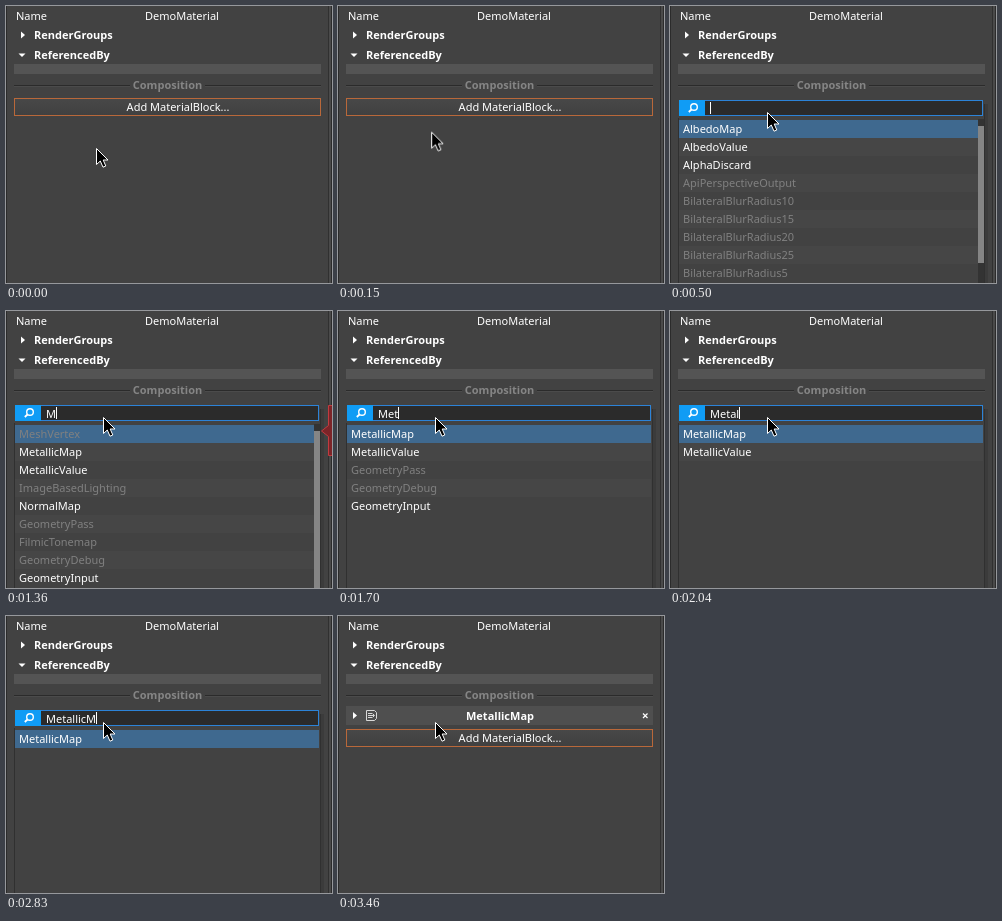
Animation, 326 px wide and 277 px high, one loop 4520 ms. Source, as an HTML page:

```html
<!DOCTYPE html>
<html lang="en">
<head>
<meta charset="utf-8">
<title>Material editor</title>
<style>
  html, body { margin: 0; width: 100%; height: 100%; overflow: hidden; background: #424242; }
  svg { display: block; width: 326px; height: 277px; }
  text { font: 11px "Noto Sans", "Open Sans", sans-serif; fill: #fff; white-space: pre; }
  .bold { font-weight: 700; }
  .mid { text-anchor: middle; }
  .dim { fill: #808080; }
  .scene { visibility: hidden; }
  .pointer { animation: move 4520ms linear infinite; }
  @keyframes move {
    0% { transform: translate(90px, 142px); }
    0.6637% { transform: translate(90px, 142px); animation-timing-function: steps(11, jump-start); }
    7.9646%, 100% { transform: translate(97px, 106px); }
  }
</style>
</head>
<body>
<svg id="stage" viewBox="0 0 326 277">
  <defs>
    <linearGradient id="face" x2="0" y2="1">
      <stop stop-color="#484848"/><stop offset="1" stop-color="#404040"/>
    </linearGradient>
    <g id="button">
      <rect x="8.5" y="92.5" width="306" height="17" fill="url(#face)" stroke="#b9683a"/>
      <text class="mid" x="172" y="105">Add MaterialBlock...</text>
    </g>
    <path id="closed" d="M0 0L4 3.5L0 7Z" fill="#fff"/>
  </defs>

  <rect width="326" height="277" fill="#424242"/>
  <path d="M.5 0V277" stroke="#2b2b2b"/>
  <path d="M322.5 0V277" stroke="#303030"/>
  <path d="M324 0V277" stroke="#4a4a4a" stroke-width="2"/>
  <path d="M325.5 0V277" stroke="#2b2b2b"/>
  <text x="10" y="14">Name</text>
  <text x="139" y="14">DemoMaterial</text>
  <use href="#closed" x="15" y="25.5"/>
  <text class="bold" x="28" y="33">RenderGroups</text>
  <path d="M12.5 47.5H19.5L16 51Z" fill="#fff"/>
  <text class="bold" x="28" y="53">ReferencedBy</text>
  <rect x="8" y="58" width="307" height="10" fill="#545454"/>
  <path d="M8 79.5H124M199 79.5H315" stroke="#2b2b2b"/>
  <path d="M8 80.5H124M199 80.5H315" stroke="#4b4b4b"/>
  <text class="bold mid" x="161.5" y="83" style="fill:#858585">Composition</text>

  <g id="scenes"></g>

  <g class="pointer">
    <path d="M.5 .5V16.5L4.3 13L7 19.2L9.8 18L7.2 12H12Z" fill="#000" stroke="#fff"/>
  </g>
</svg>
<script>
const LOOP = 4520;
const scenes = document.getElementById('scenes');
const sheet = document.head.appendChild(document.createElement('style'));

// Adds a group that is visible only from start to end (ms).
function scene(start, end, markup) {
  const name = 'show' + start;
  const pct = ms => (ms / LOOP * 100).toFixed(4) + '%';
  const g = document.createElementNS('http://www.w3.org/2000/svg', 'g');
  g.setAttribute('class', 'scene');
  g.style.animation = `${name} ${LOOP}ms step-end infinite`;
  g.innerHTML = markup;
  scenes.append(g);
  const before = start ? '0% { visibility: hidden } ' : '';
  const after = end < LOOP ? 'hidden' : 'visible';
  sheet.textContent += `@keyframes ${name} { ${before}${pct(start)} { visibility: visible }
    ${pct(end)}, 100% { visibility: ${after} } }\n`;
  return g;
}

const rect = (x, y, w, h, fill) =>
  `<rect x="${x}" y="${y}" width="${w}" height="${h}" fill="${fill}"/>`;

const searchBox = `
  ${rect(8, 92, 307, 185, '#424242')}
  <path d="M314.5 98V277" stroke="#303030"/>
  <path d="M316.5 98V277" stroke="#3b3b3b" stroke-width="3"/>
  <path d="M8.5 112V277" stroke="#303030"/>
  <rect x="9.5" y="94.5" width="303" height="15" fill="#2b2b2b" stroke="#2c83d8"/>
  ${rect(9, 94, 26, 16, '#109cf5')}
  <circle cx="24" cy="101" r="3.3" fill="none" stroke="#fff" stroke-width="1.4"/>
  <path d="M21.5 103.5L18.8 106" stroke="#fff" stroke-width="1.8"/>`;

const callout = `<path d="M328 94.5H322.5V114.5L315.5 120L322.5 125.5V144.5H328"
  fill="#7c2428" stroke="#c23a3f"/>`;

// Items starting with "-" are greyed out.
function popup(start, end, query, items, thumb, extra = '') {
  const width = thumb ? 299 : 304;
  const rows = items.map((item, i) => {
    const y = 114 + 18 * i;
    const fill = i === 0 ? '#3f698f' : i % 2 ? '#464646' : '#424242';
    const dim = item[0] === '-';
    return rect(9, y, width, 18, fill) +
      `<text x="13" y="${y + 13}"${dim ? ' class="dim"' : ''}>${dim ? item.slice(1) : item}</text>`;
  }).join('');
  const bar = thumb ? rect(308, 113, 6, 164, '#333') + rect(308, 120, 6, thumb, '#858585') : '';
  const g = scene(start, end, searchBox + rows + bar + extra +
    `<text class="query" x="40" y="107">${query}</text>`);
  const length = query ? g.querySelector('.query').getComputedTextLength() : 0;
  g.insertAdjacentHTML('beforeend', rect(40 + Math.round(length), 96, 1, 12, '#fff'));
}

const metallic = ['MetallicMap', 'MetallicValue'];
const geometry = ['-GeometryPass', '-GeometryDebug', 'GeometryInput'];
const blurs = [10, 15, 20, 25, 5].map(r => '-BilateralBlurRadius' + r);

scene(0, 500, '<use href="#button"/>');

popup(500, 1360, '',
  ['AlbedoMap', 'AlbedoValue', 'AlphaDiscard', '-ApiPerspectiveOutput', ...blurs], 137);
popup(1360, 1530, 'M',
  ['-MeshVertex', ...metallic, '-ImageBasedLighting', 'NormalMap', '-GeometryPass',
   '-FilmicTonemap', '-GeometryDebug', 'GeometryInput'], 157, callout);
popup(1530, 1700, 'Me',
  ['-MeshVertex', ...metallic, ...geometry, '-VolumeInput', '-RuntimeOutput', '-ElapsedTimeInput'],
  0, callout);
popup(1700, 1870, 'Met', [...metallic, ...geometry]);

const keys = [1870, 2040, 2140, 2270, 2400, 2830, 3460];
keys.slice(0, -1).forEach((start, i) => {
  const query = 'MetallicM'.slice(0, 4 + i);
  popup(start, keys[i + 1], query, metallic.filter(item => item.startsWith(query)));
});

scene(3460, LOOP, `
  ${rect(8, 90, 307, 19, '#4f4f4f')}
  <use href="#closed" x="15" y="96"/>
  <path d="M36.5 94.5H28.5V104.5H36.5L38.5 102.5V96.5ZM30 97.5H34M30 99.5H36M30 101.5H34M34.5 97.5L36.5 99.5L34.5 101.5"
    fill="none" stroke="#d8d8d8"/>
  <text class="bold mid" x="162" y="104">MetallicMap</text>
  <path d="M305 97.5L309.5 102M309.5 97.5L305 102" stroke="#fff" stroke-width="1.2"/>
  <use href="#button" y="21"/>`);
</script>
</body>
</html>
```
